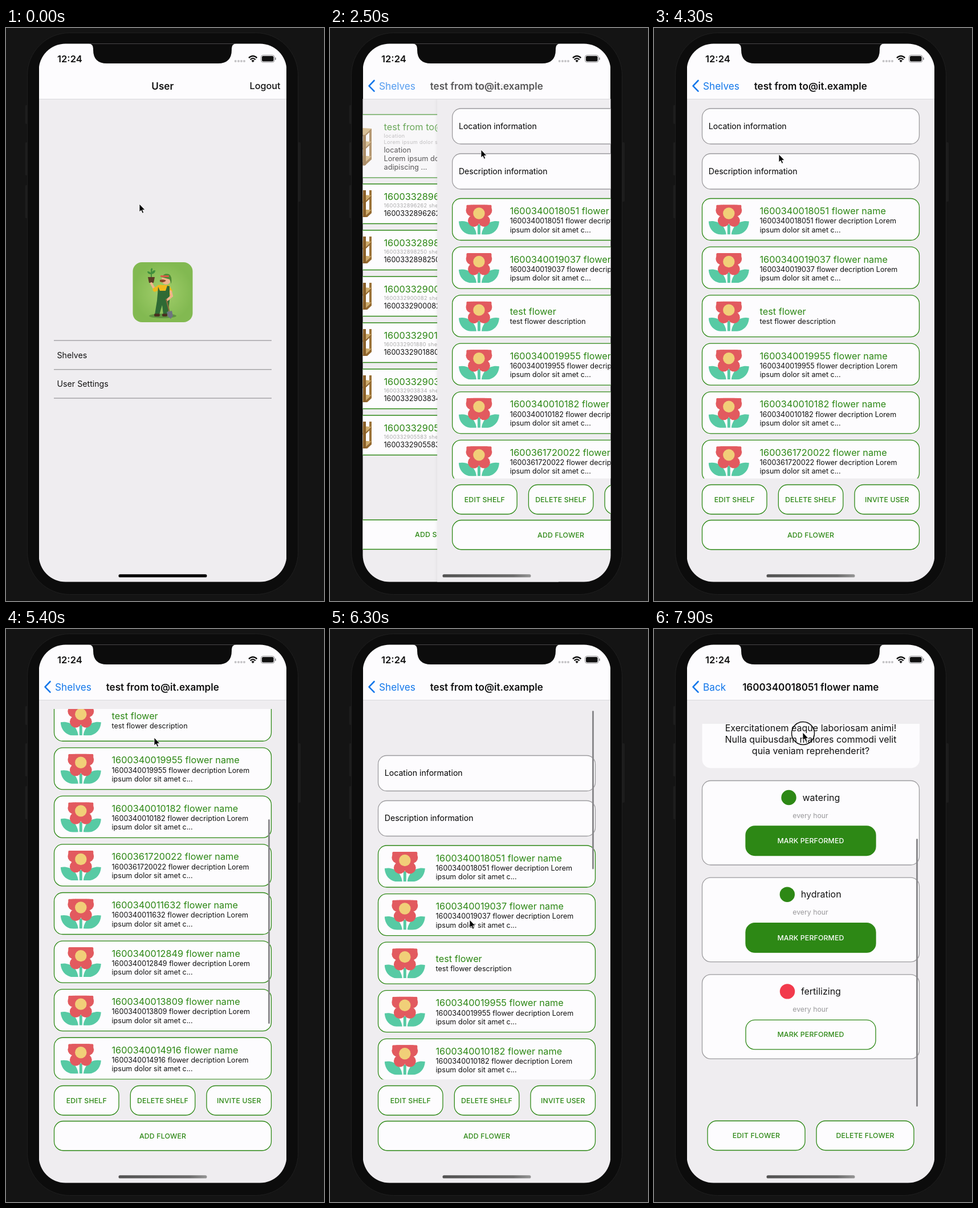
Recreate the animation shown at these times as an HTML page. Size 558 by 1003 pixels, loop 8 s.

```html
<!DOCTYPE html>
<html lang="en">
<head>
<meta charset="utf-8">
<title>Flower shelves</title>
<style>
html, body { margin: 0; width: 100%; height: 100%; overflow: hidden; background: #141414; }
svg { display: block; font-family: Inter, "Liberation Sans", sans-serif; }
</style>
</head>
<body>
<svg id="stage" width="558" height="1003" viewBox="0 0 558 1003"></svg>
<script>
const GREEN = '#2d8815', GREY = '#9c9b9e', BLUE = '#1277ea', PAGE = '#efedf0', WHITE = '#fdfcfe';
const LOOP = 8000, WIDTH = 434;

const text = (x, y, size, str, fill = '#111', attr = '') =>
  `<text x="${x}" y="${y}" font-size="${size}" fill="${fill}" ${attr}>${str}</text>`;
const mid = (x, y, size, str, fill, attr = '') => text(x, y, size, str, fill, 'text-anchor="middle" ' + attr);
const rect = (x, y, w, h, r, fill, stroke = 'none', sw = 1.3, attr = '') =>
  `<rect x="${x}" y="${y}" width="${w}" height="${h}" rx="${r}" fill="${fill}" stroke="${stroke}" stroke-width="${sw}" ${attr}/>`;
const circle = (x, y, r, fill) => `<circle cx="${x}" cy="${y}" r="${r}" fill="${fill}"/>`;
const path = (d, fill, attr = '') => `<path d="${d}" fill="${fill}" ${attr}/>`;
const line = (d, stroke, w, attr = '') => path(d, 'none', `stroke="${stroke}" stroke-width="${w}" ${attr}`);
const group = (id, body, attr = '') => `<g id="${id}" ${attr}>${body}</g>`;
const view = (y, h, body) =>
  `<svg x="0" y="${y}" width="558" height="${h}" viewBox="0 ${y} 558 ${h}">${body}</svg>`;
const card = (y, h, stroke = GREEN) => rect(84.5, y, 381, h, 15, WHITE, stroke);
const scrollBar = (id, y, h) => rect(460, y, 3, h, 1.5, '#8b8a8d', 'none', 0, `id="${id}"`);
const button = (x, y, w, label, solid) =>
  rect(x, y, w, 51.5, 16, solid ? GREEN : WHITE, GREEN) +
  mid(x + w / 2, y + 30, 12.3, label, solid ? '#fff' : GREEN, 'font-weight="500" letter-spacing=".15"');
const page = (id, body) => group(id,
  `<rect x="58" y="124" width="${WIDTH}" height="850" fill="${PAGE}" filter="url(#edge)"/>` + body);

// User page
const gardener =
  rect(222.5, 410, 105, 105, 16, 'url(#lawn)') +
  `<ellipse cx="275" cy="504" rx="24" ry="4" fill="#5f9440"/>` +
  line('M255 437V424', '#2f7a35', 1.5) +
  path('M255 431q-7 0-7-5q6 0 7 5q0-7 7-7q0 6-7 7M255 426q-3-3 1-6q3 3-1 6', '#3f8f3c') +
  path('M249 436h12l-2 10h-8z', '#5b3b25') +
  line('M255 447L261 458', '#f0b48c', 4, 'stroke-linecap="round"') +
  line('M261 458L271 453', '#f0b91d', 7, 'stroke-linecap="round"') +
  path('M266 450h20l6 10l-3 8h-23z', '#f0b91d') +
  circle(281, 441, 8, '#f0b48c') +
  path('M273 436q5-8 13-5q6 3 4 17l-3-8z', '#4c8a35') + rect(271, 433, 15, 3, 1, '#d95c45') +
  path('M270 441q6-2 11 1q-4 5-11 2z', '#8a4325') +
  path('M267 453l3 7h10l3-9l4 1v25l-3 25h-8l-2-17l-5 17h-8l4-25z', '#2f6a34') +
  line('M289 461L291 469L283 476', '#f0b48c', 4, 'stroke-linecap="round"') +
  line('M281 474L287 498', '#8b6a3c', 2) +
  path('M282 497l9-2l2 9l-4 5l-5-4z', '#6f7480') +
  rect(260, 500, 10, 5, 2, '#4a3020') + rect(274, 500, 9, 5, 2, '#4a3020');
const userPage = page('user', gardener +
  [547, 597.7, 648].map(y => line(`M84 ${y}H466`, '#a6a5a8', 1.5)).join('') +
  text(89.5, 578, 14.2, 'Shelves', '#111', 'id="row"') + text(89.5, 628.3, 14.2, 'User Settings'));

// Shelves page
const board = (y, edge) =>
  path(`M99 ${y}L116 ${y - 8}L164 ${y - 5}L152 ${y + 6}z`, '#cdab6c') +
  path(`M99 ${y}L152 ${y + 6}L164 ${y - 5}v${edge}L152 ${y + 6 + edge}L99 ${y + edge}z`, '#94692f');
const post = (x, y, h, w, fill) => rect(x, y, w, h, 0, fill);
const rack = post(117, 174, 51, 3.5, '#7d5726') + post(160, 178, 50, 4, '#9a7138') +
  board(229.5, 5.5) + board(204, 3) + board(181, 3) +
  post(99, 182, 52, 4.5, '#a67a3c') + post(149, 188, 52, 5, '#8a602a');
const shelfRow = (num, i) => {
  const y = 273 + 81 * i, name = num + ' shelf name';
  return card(y, 69.5) +
    `<svg x="99" y="${y + 11}" width="65" height="47" viewBox="99 190 65 47">${rack}</svg>` +
    text(185.5, y + 28, 16.3, name, GREEN) +
    text(185.5, y + 41, 9.15, num + ' shelf location', '#aaa', 'letter-spacing=".35"') +
    text(185.5, y + 55.5, 12.6, name);
};
const OWNER = 'test from to@it.example';
const topShelf = card(151.5, 110.5) + rack + text(185.5, 179, 16.3, OWNER, GREEN) +
  text(185.5, 192, 9.15, 'location', '#aaa', 'letter-spacing=".35"') +
  text(185.5, 203, 9.15, 'Lorem ipsum dolor sit amet, con...', '#aaa', 'letter-spacing=".35"') +
  ['location', 'Lorem ipsum dolor sit amet, consectetur', 'adipiscing ...']
    .map((s, i) => text(185.5, 217.5 + 15.3 * i, 12.75, s)).join('');
const shelfPage = page('shelves', group('first', topShelf) +
  [1600332896262, 1600332898250, 1600332900082, 1600332901880, 1600332903834, 1600332905583].map(shelfRow).join('') +
  button(84.5, 861, 381, 'ADD SHELF'));

// Single shelf page with its flowers
const flower = (x, y) => `<svg x="${x}" y="${y}" width="72" height="52" viewBox="0 0 72 52">` +
  rect(33, 34, 5, 18, 0, '#57caa4') +
  path('M0 29C15 26 29 35 31 52C14 55 1 46 0 29M71 29C56 26 42 35 40 52C57 55 70 46 71 29', '#57caa4') +
  [[35.5, 0], [23, 10], [48, 10], [26.5, 28], [44.5, 28]].map(([a, b]) => circle(a, b, 10.4, '#e25a5f')).join('') +
  rect(13.5, 0, 44, 7, 2, '#e25a5f') +
  circle(35.5, 15, 14, '#e25a5f') + circle(35.5, 15, 10.2, '#f1cf78') + '</svg>';
const flowerRow = (num, i) => {
  const y = 298.5 + 84.57 * i;
  const body = num
    ? text(185.5, y + 27.5, 16.3, num + ' flower name', GREEN) +
      text(185.5, y + 43.8, 12.6, num + ' flower decription Lorem') +
      text(185.5, y + 59, 12.6, 'ipsum dolor sit amet c...')
    : text(185.5, y + 34.5, 16.3, 'test flower', GREEN) + text(185.5, y + 50.5, 12.6, 'test flower description');
  return group('flower' + i, card(y, 73) + flower(95.8, y + 11) + body);
};
const infoRow = (y, label) => card(y, 62, GREY) + text(95.8, y + 35.5, 14.1, label, '#000');
const listPage = page('list', view(140, 648.5, group('listBody',
    infoRow(141, 'Location information') + infoRow(220, 'Description information') +
    [1600340018051, 1600340019037, 0, 1600340019955, 1600340010182, 1600361720022, 1600340011632, 1600340012849,
     1600340013809, 1600340014916, 1600340015872, 1600340016790].map(flowerRow).join(''))) +
  scrollBar('listBar', 143, 358) +
  button(84.5, 799.5, 113.5, 'EDIT SHELF') + button(218.3, 799.5, 113.5, 'DELETE SHELF') +
  button(352, 799.5, 113.5, 'INVITE USER') + button(84.5, 861.5, 381, 'ADD FLOWER'));

// Flower page
const task = (name, x, color, i) => {
  const y = 558.5 + 169.7 * i;
  return card(y, 147.5, GREY) + circle(x, y + 29.5, 13.2, color) + text(x + 24, y + 35, 16, name) +
    mid(274.5, y + 65, 12.3, 'every hour', '#9a999c') + button(161, y + 79.5, 228, 'MARK PERFORMED', color === GREEN);
};
const detailPage = page('detail', view(166, 673, group('detailBody',
    rect(84.5, 166, 381.5, 370.5, 15, WHITE) +
    `<g transform="translate(203 200) scale(2)">${flower(0, 0)}</g>` +
    ['1600340018051 flower decription', 'Lorem ipsum dolor sit amet', 'consectetur adipisicing elit.',
     'Exercitationem eaque laboriosam animi!', 'Nulla quibusdam maiores commodi velit', 'quia veniam reprehenderit?']
      .map((s, i) => mid(275, 412 + 20 * i, 16, s)).join('') +
    task('watering', 236.5, GREEN, 0) + task('hydration', 233.8, GREEN, 1) + task('fertilizing', 234, '#f23a4c', 2))) +
  scrollBar('detailBar', 367, 469) +
  button(94, 861, 171, 'EDIT FLOWER') + button(285, 861, 171, 'DELETE FLOWER'));

// Header, status bar and phone
const title = s => mid(274.8, 107.5, 17.1, s, '#111', 'font-weight="600"');
const back = s => text(86, 107.5, 17.2, s, BLUE);
const header = rect(58, 20, WIDTH, 104, 0, WHITE) + rect(58, 124, WIDTH, 1, 0, '#dad9dc') +
  group('head0', title('User') + text(427.5, 107.3, 16.2, 'Logout', '#111', 'font-weight="500"')) +
  group('head1', title('Shelves') + back('User')) +
  group('head2', title(OWNER) + back('Shelves')) +
  group('head3', title('1600340018051 flower name') + back('Back')) +
  line('M77.5 92L68.5 101.3L77.5 110.6', BLUE, 2.6, 'id="chevron" stroke-linecap="round" stroke-linejoin="round"');
const status = text(90, 60, 16.6, '12:24', '#111', 'font-weight="600"') +
  [402.7, 408, 413, 418].map(x => circle(x, 58, 2, '#c4c3c6')).join('') +
  line('M426 52.4Q433.2 45.6 440.4 52.4M428.7 55.3Q433.2 51 437.7 55.3', '#111', 2.3) +
  path('M430.6 57.2Q433.2 55 435.8 57.2L433.2 60.2z', '#111') +
  rect(447.5, 47.5, 23.5, 12.5, 3.6, 'none', '#8f8e91', 1) + rect(449, 49, 20.5, 9.5, 2.2, '#111') +
  rect(472, 51.5, 1.8, 4.5, 1, '#8f8e91');
const notch = path('M145 27Q153 28 153 36V38Q153 62 177 62H372Q396 62 396 38V36Q396 28 404 27z', '#0c0c0c');

document.getElementById('stage').innerHTML = `<defs>
  <clipPath id="screen"><rect x="57.5" y="27.5" width="435" height="942" rx="47"/></clipPath>
  <radialGradient id="lawn"><stop stop-color="#a3cf6c"/><stop offset="1" stop-color="#82b951"/></radialGradient>
  <linearGradient id="bar"><stop stop-color="#525252"/><stop offset=".8" stop-color="#6c6c6c"/><stop offset="1" stop-color="#959595"/></linearGradient>
  <filter id="edge"><feDropShadow dx="-1" dy="0" stdDeviation="2" flood-opacity=".06"/></filter></defs>` +
  rect(0, 0, 558, 1003, 0, '#141414') +
  [[135, 33], [200, 58], [275, 58]].map(([y, h]) => rect(33.5, y, 5, h, 2, '#1d1d1d')).join('') +
  rect(512, 200, 5, 104, 2, '#1d1d1d') +
  rect(37.5, 8.5, 475, 983, 74, '#0c0c0c', '#1f1f1f', 1) +
  group('glass', userPage + shelfPage + listPage + detailPage + header + status + notch, 'clip-path="url(#screen)"') +
  rect(197.5, 956.3, 155, 5.2, 2.6, '#000', 'none', 0, 'id="home"') +
  group('cursor', `<circle id="ring" cx=".5" cy="1.5" r="20" fill="none" stroke="#111" stroke-width="1.5"/>` +
    path('M0 0V14L3.2 11.2L5.3 16.3L7.7 15.3L5.6 10.4H10z', '#000', 'stroke="#fff" stroke-width=".9"'));

// Motion
const $ = id => document.getElementById(id);
const set = (id, name, value) => $(id).setAttribute(name, value);
const clamp = v => Math.max(0, Math.min(1, v));
const track = (keys, t, k) => {
  let i = keys.findIndex(key => key[0] > t);
  if (i === 0) return keys[0][k];
  if (i < 0) return keys[keys.length - 1][k];
  const a = keys[i - 1], b = keys[i], u = (t - a[0]) / (b[0] - a[0]);
  return a[k] + (b[k] - a[k]) * u * u * (3 - 2 * u);
};
const CURSOR = [[0, 234, 308], [500, 163, 578], [1100, 163, 578], [2000, 265, 213], [2700, 265, 213], [3300, 219, 221],
  [4300, 219, 221], [4650, 258, 560], [4700, 258, 560], [5100, 260, 190], [5750, 260, 190], [6200, 245, 509],
  [6350, 245, 509], [6650, 250, 345], [6950, 250, 345], [7350, 258, 475], [7500, 258, 475], [7900, 261, 181]];
const LIST = [[4700, 0], [5350, 344.4], [5750, 344.4], [6300, -80.5], [6700, 0]];
const DETAIL = [[7500, 0], [7900, 293]];
const TOUCH = [[500, 600], [2100, 2300], [4700, 5100], [5750, 6150], [6700, 6800], [7500, LOOP]];
const PAGES = ['user', 'shelves', 'list', 'detail'], PUSH = [-1000, 702, 2370, 6890];

const pushed = (i, t) => i > 3 ? 0 : 1 - (1 - clamp((t - PUSH[i]) / 500)) ** 4;
const dim = (t, start) => 1 - .8 * Math.min(clamp((t - start) / 100), 1 - clamp((t - start - 200) / 250));

function draw(t) {
  PAGES.forEach((id, i) => {
    const p = pushed(i, t), q = pushed(i + 1, t);
    set(id, 'transform', `translate(${WIDTH * (1 - p) - 130 * q})`);
    set(id, 'visibility', p > 0 && q < 1 ? 'visible' : 'hidden');
    set('head' + i, 'opacity', p * (1 - q) ** 2);
  });
  set('chevron', 'opacity', pushed(1, t));
  set('row', 'opacity', dim(t, 500));
  set('first', 'opacity', dim(t, 2150));
  set('flower0', 'opacity', dim(t, 6700));
  set('home', 'fill', t < 800 ? '#000' : 'url(#bar)');

  const s = track(LIST, t, 1);
  set('listBody', 'transform', `translate(0 ${-s})`);
  set('listBar', 'y', 143 + Math.max(0, s) / 515 * 284);
  set('listBar', 'height', 358 + Math.min(0, s));
  set('listBar', 'opacity', t > 4700 && t < 6800 ? 1 : 0);

  const d = track(DETAIL, t, 1);
  set('detailBody', 'transform', `translate(0 ${-d})`);
  set('detailBar', 'y', 169 + d / 293 * 198);
  set('detailBar', 'opacity', t > 7500 ? 1 : 0);

  set('cursor', 'transform', `translate(${track(CURSOR, t, 1)} ${track(CURSOR, t, 2)})`);
  set('ring', 'opacity', TOUCH.some(([a, b]) => t >= a && t < b) ? 1 : 0);
}

// The picture advances ten times a second.
const start = performance.now();
function tick(now) {
  draw(Math.floor(Math.max(0, now - start) % LOOP / 100) * 100);
  requestAnimationFrame(tick);
}
draw(0);
requestAnimationFrame(tick);
</script>
</body>
</html>
```
